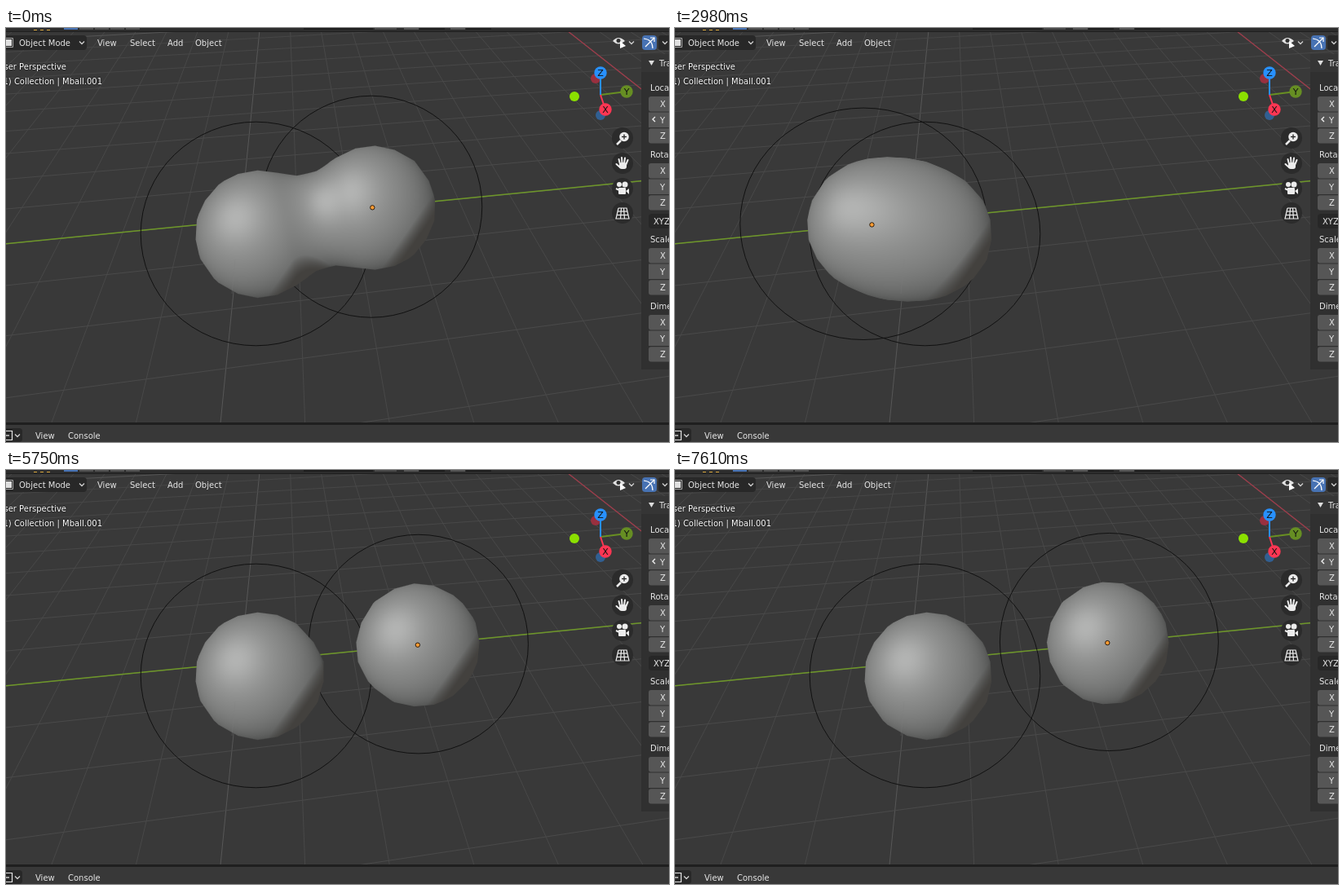
Animation, 813 px wide and 508 px high, one loop 8.34 s. Source, as an HTML page with a canvas:

```html
<!DOCTYPE html>
<html>
<head>
<meta charset="utf-8">
<style>
html, body { margin: 0; width: 100%; height: 100%; overflow: hidden; background: #393939; }
canvas { display: block; }
</style>
</head>
<body>
<canvas id="stage" width="813" height="508"></canvas>
<script>
const W = 813, H = 508, LOOP = 8340;
const makeCanvas = (w, h) => Object.assign(document.createElement('canvas'), { width: w, height: h });
const screen = document.getElementById('stage').getContext('2d');
const scene = makeCanvas(W, H);
const c = scene.getContext('2d');
const clamp = (v, lo = 0, hi = 1) => Math.min(hi, Math.max(lo, v));
const mix = (a, b, t) => a + (b - a) * t;

// ---- drawing helpers ----
function line(color, width, ...p) {
  c.strokeStyle = color;
  c.lineWidth = width;
  c.beginPath();
  for (let i = 0; i < p.length; i += 2) c.lineTo(p[i], p[i + 1]);
  c.stroke();
}
function rect(color, x, y, w, h, r = 0) {
  c.fillStyle = color;
  c.beginPath();
  c.roundRect(x, y, w, h, r);
  c.fill();
}
function disc(color, x, y, r) {
  c.fillStyle = color;
  c.beginPath();
  c.arc(x, y, r, 0, 7);
  c.fill();
}
function text(s, x, y, align = 'left', color = '#e6e6e6', size = 10) {
  c.font = size + 'px "DejaVu Sans", sans-serif';
  c.textAlign = align;
  c.textBaseline = 'alphabetic';
  c.fillStyle = color;
  c.fillText(s, x, y);
}
const chevron = (x, y) => line('#d0d0d0', 1.3, x - 3, y - 1.5, x, y + 1.5, x + 3, y - 1.5);

// ---- floor grid: ground coordinates (a = depth, b = along the green axis) ----
function project(a, b) {
  const z = .806 * a + .146 * b + .573;
  return [500 + 732 * (-.178 * a + .984 * b) / z,
          240 + 732 * (-.564 * a - .102 * b + .819) / z];
}
function drawFloor() {
  const cellA = .1907, cellB = .1644, red = 1.4, green = 1.511;
  for (let i = -4; i < 40; i++) {
    const b = red - cellB * i;
    line(i % 10 ? '#484848' : '#575757', 1, ...project(.4, b), ...project(6, b));
  }
  for (let j = -5; j < 22; j++) {
    const a = green + cellA * j, v = Math.round(74 - Math.max(0, j) * .4);
    line(j % 10 ? `rgb(${v},${v},${v})` : '#555', 1, ...project(a, -5), ...project(a, 4));
  }
  line('#9d3c4a', 1.3, ...project(green, red), ...project(6, red));
  line('#6d9628', 1.4, 0, 264.8, 813, 184.3);
}

function drawHeader() {
  rect('#2d2d2d', 0, 0, W, 4);
  rect('#1f1f1f', 0, 4, W, 1);
  rect('#d9a63a', 34, 2, 4, 1); rect('#d9a63a', 42, 2, 4, 1); rect('#d9a63a', 50, 2, 4, 1);
  rect('#4772b3', 71, 0, 17, 2);
  for (let i = 0; i < 4; i++) rect('#525252', 90 + i * 19, 0, 17, 2);
  rect('#1d1d1d', 365, 0, 85, 2); rect('#4a4a4a', 452, 0, 27, 2);
  rect('#555', 488, 0, 18, 2); rect('#1d1d1d', 507, 0, 31, 2);
  rect('#555', 545, 0, 18, 2); rect('#1d1d1d', 564, 0, 31, 2);

  rect('#282828', -8, 9, 107, 18, 4);
  rect('#e0e0e0', 0, 14, 7, 8);
  line('#aaa', 1, 0, 12.5, 8.5, 12.5, 8.5, 23.5, 0, 23.5);
  text('Object Mode', 16, 22);
  chevron(93, 18);
  text('View', 112, 22); text('Select', 152, 22);
  text('Add', 198, 22); text('Object', 232, 22);
  c.shadowColor = '#000';
  c.shadowBlur = 2;
  text('User Perspective', 74, 51, 'right', '#fff');
  text('(1) Collection | Mball.001', 118, 69, 'right', '#fff');
  c.shadowBlur = 0;

  // visibility and gizmo toggles
  c.fillStyle = '#e4e4e4';
  c.beginPath();
  c.moveTo(744, 16); c.quadraticCurveTo(751, 8, 759, 16); c.quadraticCurveTo(751, 23, 744, 16);
  c.fill();
  disc('#333', 751, 15.5, 2.5);
  c.fillStyle = '#fff';
  c.beginPath();
  c.moveTo(753, 16); c.lineTo(760, 22); c.lineTo(753, 25);
  c.fill();
  chevron(767, 18);
  rect('#4772b3', 780, 9, 18, 18, 4);
  c.strokeStyle = '#fff';
  c.lineWidth = 1.2;
  c.beginPath();
  c.moveTo(782, 13); c.quadraticCurveTo(793, 14, 793, 25);
  c.stroke();
  line('#fff', 1.2, 784, 23, 795, 12);
  line('#fff', 1.2, 790, 12, 795, 12, 795, 17);
  rect('#282828', 800, 9, 20, 18, 3);
  chevron(808, 18);
}

function drawGizmo() {
  disc('#99303f', 723, 62, 6);
  disc('#315f91', 729, 107, 6);
  disc('#8be000', 697, 84, 6);
  line('#688f22', 2, 729, 82, 761, 78);
  line('#2890ff', 2, 729, 82, 729, 55);
  line('#ff3653', 2, 729, 82, 735, 100);
  for (const [label, x, y, color] of [['Y', 761, 78, '#668e23'], ['Z', 729, 55, '#2890ff'], ['X', 735, 100, '#ff3653']]) {
    disc(color, x, y, 7.7);
    text(label, x, y + 4, 'center', '#111', 11);
  }
}

function drawNavigation() {
  const w = '#ececec';
  for (const y of [135, 166, 197, 227]) disc('#2b2b2b', 756, y, 13);
  disc(w, 758, 133.5, 5.8);
  line(w, 2.5, 754, 138, 749, 143);
  line('#222', 1.3, 755, 133.5, 761, 133.5);
  line('#222', 1.3, 758, 130.5, 758, 136.5);

  rect(w, 752, 165, 9, 8, 3);
  c.lineCap = 'round';
  line(w, 2, 753, 167, 751.5, 161); line(w, 2, 755.5, 166, 755, 159);
  line(w, 2, 758, 166, 759, 159.5); line(w, 2, 760, 168, 762.5, 162);
  line(w, 2, 753, 171, 748.5, 167);
  c.lineCap = 'butt';

  disc(w, 752, 192, 3); disc(w, 759, 192, 3.5);
  rect(w, 751, 196, 9, 8, 1);
  line(w, 2, 748, 197, 752, 199);
  c.fillStyle = w;
  c.beginPath();
  c.moveTo(760, 200); c.lineTo(764, 197); c.lineTo(764, 204);
  c.fill();

  line(w, 1.2, 751, 221, 761, 221, 764, 234, 748, 234, 751, 221);
  line(w, 1.2, 750, 225, 762, 225); line(w, 1.2, 749, 229.5, 763, 229.5);
  line(w, 1.2, 754.5, 221, 753.5, 234); line(w, 1.2, 757.5, 221, 758.5, 234);
}

function drawPanel() {
  rect('#303030', 779, 32, 40, 387);
  rect('#353535', 779, 32, 40, 22);
  c.fillStyle = '#ddd';
  c.beginPath();
  c.moveTo(788, 40); c.lineTo(795, 40); c.lineTo(791.5, 46);
  c.fill();
  text('Transform', 801, 47);
  for (const [label, y] of [['Location', 73], ['Rotation', 155], ['Scale', 259], ['Dimensions', 341]]) {
    text(label, 790, y + 4);
    [...'XYZ'].forEach((axis, i) => {
      const top = y + 11 + i * 19.6;
      rect('#565656', 788, top, 40, 18.4, i === 1 ? 0 : 3);
      text(axis, 802, top + 13);
    });
  }
  line('#eee', 1.4, 796, 109, 793, 112, 796, 115);
  rect('#272727', 788, 228, 40, 18, 4);
  text('XYZ Euler', 794, 241);
}

function drawFooter() {
  rect('#1f1f1f', 0, 484, W, 3);
  rect('#383838', 0, 487, W, 21);
  rect('#282828', -6, 491, 26, 17, 4);
  line('#e4e4e4', 1.2, 0, 494.5, 7.5, 494.5, 7.5, 505.5, 0, 505.5);
  line('#e4e4e4', 1.3, 0, 500, 4, 500);
  chevron(14, 500);
  text('View', 36, 504); text('Console', 76, 504);
}

c.fillStyle = '#393939';
c.fillRect(0, 0, W, H);
drawFloor(); drawHeader(); drawGizmo(); drawNavigation(); drawPanel(); drawFooter();

// ---- motion: x of the dragged origin at step numbers ----
const path = [[-1, 449], [5, 412], [7, 386], [14, 323], [15, 317], [19, 239], [23, 247],
  [28, 382], [31, 396], [37, 454], [39, 474], [43, 524], [46, 483], [47, 488], [55, 530]];
const slope = i => (path[i + 1][1] - path[i][1]) / (path[i + 1][0] - path[i][0]);
function tangent(i) {
  if (i === 0 || i === path.length - 1) return slope(Math.min(i, path.length - 2));
  const p = slope(i - 1), q = slope(i);
  return p * q > 0 ? 2 * p * q / (p + q) : 0;
}
function originX(k) {
  let i = 0;
  while (i < path.length - 2 && k > path[i + 1][0]) i++;
  const [k0, x0] = path[i], [k1, x1] = path[i + 1];
  const h = k1 - k0, s = (k - k0) / h, r = 1 - s;
  return x0 * (1 + 2 * s) * r * r + x1 * s * s * (3 - 2 * s) + h * s * r * (tangent(i) * r - tangent(i + 1) * s);
}
const bursts = [[150, 1120], [1240, 2160], [2290, 3250], [3370, 4360], [4490, 5450], [5600, 6530], [6650, 7610]];
function stepAt(t) {
  let k = -1;
  bursts.forEach(([from, to], n) => {
    if (t >= from) k = n * 8 + Math.floor(Math.min(7, (t - from) / (to - from) * 7 + .2));
  });
  return k;
}

// ---- metaball surface ----
const BX = 140, BY = 115, BW = 500, BH = 240, MESH = 24;
const LEVEL = .3, EDGE = Math.cbrt(LEVEL);
const blob = makeCanvas(BW, BH), blobCtx = blob.getContext('2d');
const pixels = blobCtx.createImageData(BW, BH);

// Soft light from the upper left; the lower right rim sinks into the floor's shadow.
function shade(nx, ny, nz) {
  const d = -.36 * nx - .25 * ny + .9 * nz;
  const rim = clamp((.82 * nx + .57 * ny - .66) / .2);
  const light = 89 + 61 * d + 28 * Math.max(0, d) ** 12;
  return [mix(light, 67, rim), mix(light + 1, 65, rim), mix(light, 62, rim)];
}

function renderBlob(balls) {
  const field = (x, y) => Math.cbrt(balls.reduce((sum, b) =>
    sum + Math.max(0, 1 - ((x - b.x) ** 2 + (y - b.y) ** 2) / b.r ** 2) ** 3, 0));
  // A coarse lattice gives the outline its flat mesh edges.
  const cols = Math.ceil(BW / MESH) + 1, lattice = [];
  for (let j = 0; j <= Math.ceil(BH / MESH); j++)
    for (let i = 0; i < cols; i++) lattice.push(field(BX + i * MESH, BY + j * MESH));

  const [p, q] = balls, pp = p.r ** 2, qq = q.r ** 2, out = pixels.data;
  out.fill(0);
  for (let y = 0; y < BH; y++) for (let x = 0; x < BW; x++) {
    const i = Math.floor(x / MESH), j = Math.floor(y / MESH), u = x / MESH - i, v = y / MESH - j, n = j * cols + i;
    const g = mix(mix(lattice[n], lattice[n + 1], u), mix(lattice[n + cols], lattice[n + cols + 1], u), v);
    const alpha = clamp((g - EDGE) / .009 + .5);
    if (!alpha) continue;

    const px = BX + x - p.x, py = BY + y - p.y, qx = BX + x - q.x, qy = BY + y - q.y;
    const up = (px * px + py * py) / pp, uq = (qx * qx + qy * qy) / qq;
    let zz = 0, a, b;
    for (let s = 0; s < 7; s++) {
      a = Math.max(0, 1 - up - zz / pp);
      b = Math.max(0, 1 - uq - zz / qq);
      const rate = 3 * (a * a / pp + b * b / qq);
      zz = Math.max(0, zz + (a ** 3 + b ** 3 - LEVEL) / (rate || 1));
    }
    const wa = a * a / pp, wb = b * b / qq;
    const nx = wa * px + wb * qx, ny = wa * py + wb * qy, nz = (wa + wb) * Math.sqrt(zz);
    const len = Math.hypot(nx, ny, nz) || 1;
    out.set([...shade(nx / len, ny / len, nz / len), 255 * alpha], (y * BW + x) * 4);
  }
  blobCtx.putImageData(pixels, 0, 0);
}

function influence(x, y, rx, ry) {
  screen.strokeStyle = '#0d0d0d';
  screen.lineWidth = .9;
  screen.beginPath();
  screen.ellipse(x, y, rx, ry, 0, 0, 7);
  screen.stroke();
}

function draw(k) {
  const x = originX(k), y = 233 - (x - 323) * .1014;
  const rx = 135.2 - (x - 475) * .022 + Math.max(0, 475 - x) ** 2 * .0002, ry = 135.2 - (x - 475) * .03;
  screen.drawImage(scene, 0, 0);
  influence(306.5, 252.5, 141.3, 137.3);
  influence(x + (x - 475) * .043, y - 1, rx, ry);
  renderBlob([{ x: 310, y: 252, r: 137 }, { x: x + .5, y: y, r: ry * .984 }]);
  screen.drawImage(blob, BX, BY);

  screen.strokeStyle = 'rgba(125,125,125,.3)';
  screen.beginPath();
  screen.moveTo(277, 326);
  screen.lineTo(281, 284);
  screen.stroke();

  screen.fillStyle = '#ff9c32';
  screen.strokeStyle = '#241a10';
  screen.lineWidth = 1;
  screen.beginPath();
  screen.arc(x + .3, y + .1, 2.7, 0, 7);
  screen.fill();
  screen.stroke();
}

const start = performance.now();
let shown;
function tick() {
  const k = stepAt((performance.now() - start) % LOOP);
  if (k !== shown) draw(shown = k);
  requestAnimationFrame(tick);
}
tick();
</script>
</body>
</html>
```
